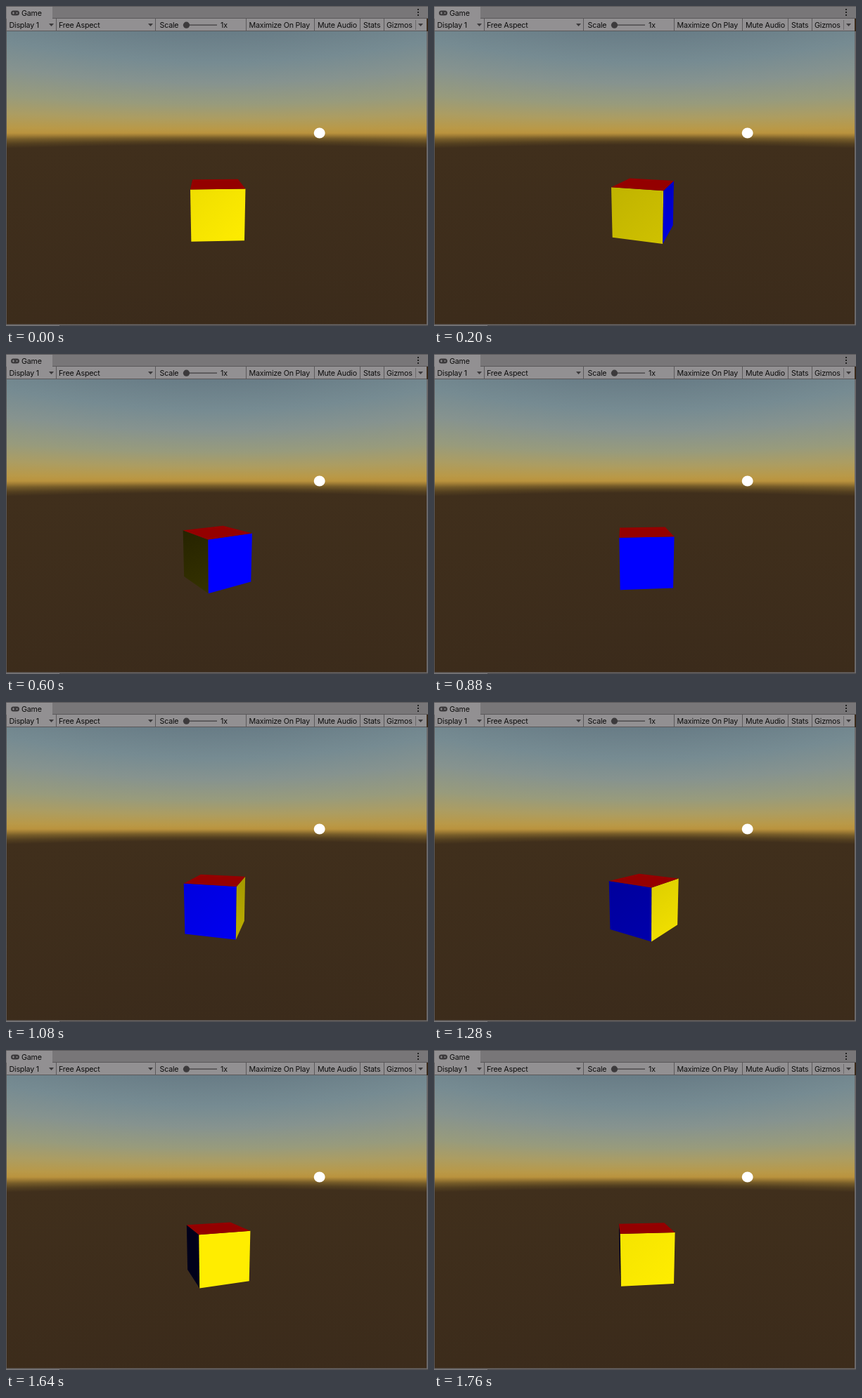
These frames come from a looping animation (600x456 px, 1800 ms). An HTML page with a canvas:

```html
<!DOCTYPE html>
<html lang="en">
<head>
<meta charset="utf-8">
<title>Spinning cube</title>
<style>
html, body { margin: 0; width: 100%; height: 100%; overflow: hidden; background: #3b2b1b; }
canvas { display: block; }
</style>
</head>
<body>
<canvas id="stage" width="600" height="456"></canvas>
<script>
const LOOP = 1800, STEP = 40;
const CX = 299.4, CY = 245, FOCAL = 362, HORIZON = 181;
const PITCH = 10 * Math.PI / 180;
const ctx = document.getElementById('stage').getContext('2d');
const scene = document.createElement('canvas');
scene.width = 600;
scene.height = 456;

function rect(c, color, x, y, w, h) {
  c.fillStyle = color;
  c.fillRect(x, y, w, h);
}

function ellipse(c, color, x, y, rx, ry = rx) {
  c.fillStyle = color;
  c.beginPath();
  c.ellipse(x, y, rx, ry, 0, 0, 7);
  c.fill();
}

function polygon(c, fill, points) {
  c.fillStyle = fill;
  c.beginPath();
  for (const [x, y] of points) c.lineTo(x, y);
  c.fill();
}

function drawSky(c) {
  const stops = [
    [36, '#687c86'], [80, '#768b92'], [110, '#86938f'], [140, '#989b7c'],
    [160, '#ac9d62'], [175, '#b99948'], [181, '#ba933e'], [184, '#a07d35'],
    [188, '#765c29'], [193, '#544020'], [198, '#402f1c'], [454, '#3b2b1b']
  ];
  const sky = c.createLinearGradient(0, 36, 0, 454);
  for (const [y, color] of stops) sky.addColorStop((y - 36) / 418, color);
  c.save();
  c.beginPath();
  c.rect(1, 36, 597, 418);
  c.clip();
  c.fillStyle = sky;
  // lines of equal elevation bend away from the horizon at the sides
  for (let x = 0; x < 600; x++) {
    const s = Math.hypot(1, (x - CX) / 367);
    c.setTransform(1, 0, 0, s, x, HORIZON * (1 - s));
    c.fillRect(0, 0, 1, 456);
  }
  c.restore();
  ellipse(c, '#fff', 445.7, 181, 8, 7.5);
}

function drawToolbar(c) {
  const ink = '#0c0c0c', dark = '#3c3a3c';
  rect(c, '#787678', 0, 0, 600, 18);
  rect(c, '#5a585a', 0, 0, 600, 1);
  rect(c, '#929092', 1, 1, 65, 17);
  rect(c, '#929092', 0, 18, 598, 18);
  rect(c, '#5a585a', 66, 17, 534, 1);
  rect(c, '#5a585a', 0, 35, 598, 1);
  for (const x of [71, 212, 341, 438, 503, 537]) rect(c, '#5a585a', x, 18, 1, 17);
  rect(c, '#6c6a6c', 582, 20, 1, 14);

  c.fillStyle = ink;
  c.font = '10.7px Inter, "Liberation Sans", sans-serif';
  c.letterSpacing = '-0.2px';
  const labels = [
    ['Game', 22, 14], ['Display 1', 4.5, 31], ['Free Aspect', 75, 31],
    ['Scale', 218.5, 31], ['1x', 305, 31], ['Maximize On Play', 345.5, 31],
    ['Mute Audio', 443, 31], ['Stats', 508, 31], ['Gizmos', 541, 31]
  ];
  for (const label of labels) c.fillText(...label);

  for (const x of [64.5, 205.5, 589.5])
    polygon(c, dark, [[x - 3.5, 25], [x + 3.5, 25], [x, 29]]);
  rect(c, dark, 258, 26.5, 42, 1.2);
  ellipse(c, dark, 256.5, 27.2, 4.6);
  for (const y of [5, 9, 13]) rect(c, '#222', 585, y - 1, 2, 2);

  // gamepad
  c.fillStyle = dark;
  c.beginPath();
  c.roundRect(7, 6.5, 12, 7, 3.5);
  c.fill();
  rect(c, '#929092', 9, 9.5, 3, 1);
  rect(c, '#929092', 10, 8.5, 1, 3);
  ellipse(c, '#929092', 15.5, 10, 1);
}

function drawFrame(c) {
  rect(c, '#5a585a', 0, 18, 1, 438);
  rect(c, '#6a686a', 598, 36, 2, 420);
  rect(c, '#6a686a', 0, 453.5, 600, 1.5);
  rect(c, '#484648', 0, 455, 600, 1);
  rect(c, '#777577', 0, 455, 76, 1);
}

// x: right, near: toward the viewer, drop: below the camera
function project(x, near, drop) {
  const far = 5 - near;
  const depth = far * Math.cos(PITCH) + drop * Math.sin(PITCH);
  const y = drop * Math.cos(PITCH) - far * Math.sin(PITCH);
  return [CX + FOCAL * x / depth, CY + FOCAL * y / depth];
}

function corner(degrees, drop) {
  const a = degrees * Math.PI / 180, r = Math.SQRT1_2;
  return project(-r * Math.sin(a), r * Math.cos(a), drop);
}

function shade(light, blue) {
  const v = Math.max(0.1, Math.min(1, light)) * 255;
  return blue ? `rgb(0,0,${v})` : `rgb(${v},${v * 0.93},0)`;
}

function drawCube(turn) {
  for (let i = 0; i < 4; i++) {
    const a = turn - 90 * i, blue = i % 2;
    const face = [
      corner(a + 45, 1), corner(a - 45, 1), corner(a - 45, 2), corner(a + 45, 2)
    ];
    if (face[0][0] >= face[1][0]) continue;
    const light = Math.cos((a + 25) * Math.PI / 180) + (blue ? 0.14 : 0.04);
    const fill = ctx.createLinearGradient(...face[0], ...face[2]);
    fill.addColorStop(0, shade(light - 0.03, blue));
    fill.addColorStop(1, shade(light + 0.03, blue));
    polygon(ctx, fill, face);
  }
  polygon(ctx, '#940000', [45, 135, 225, 315].map(d => corner(turn + d, 1)));
}

function tick(now) {
  const t = Math.floor((now - start) % LOOP / STEP) * STEP;
  ctx.drawImage(scene, 0, 0);
  drawCube(t / 10 - 3);
  requestAnimationFrame(() => tick(performance.now()));
}

const back = scene.getContext('2d');
drawSky(back);
drawToolbar(back);
drawFrame(back);
const start = performance.now();
tick(start);
</script>
</body>
</html>
```
